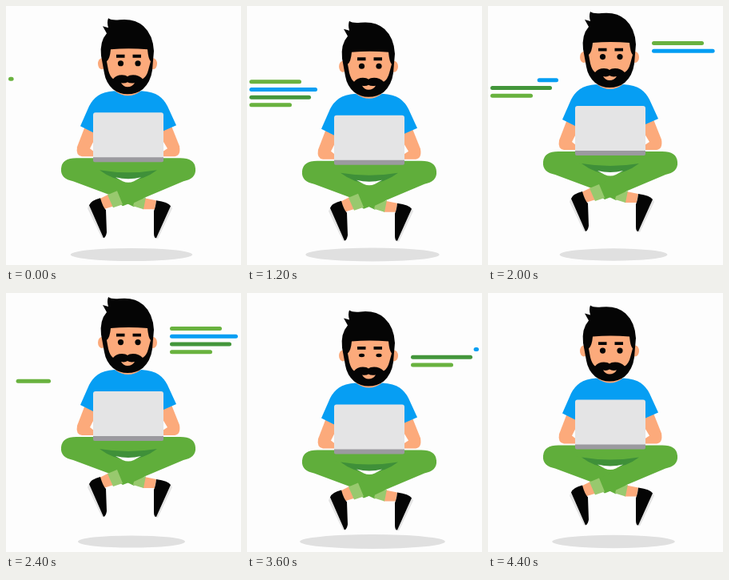
An HTML page for the animation above (4500 ms loop, 294 by 324 pixels).

```html
<!DOCTYPE html>
<html lang="en">
<head>
<meta charset="utf-8">
<title>Floating coder</title>
<style>
html, body { margin: 0; width: 100%; height: 100%; overflow: hidden; background: #fdfdfd; }
svg { display: block; width: 294px; height: 324px; }
.skin { fill: #fcaa7b; }
.shirt { fill: #069ef3; }
.pants { fill: #60ae3b; }
.cuff { fill: #98c96e; }
.ink { fill: #050505; }
.gap { fill: #fdfdfd; }
</style>
</head>
<body>
<svg viewBox="0 0 294 324">
  <ellipse id="shadow" cx="157" cy="311" fill="#e0e0e0"/>
  <g id="float">
    <g id="lines" fill="none" stroke-width="5" stroke-linecap="round"></g>

    <!-- arms and shirt -->
    <g class="skin">
      <path d="M99 150L89 176Q87 187 95 188H114V150Z"/>
      <path d="M207 150L217 175Q219 187 211 188H194V150Z"/>
      <path d="M137 100H168V114H137Z"/>
    </g>
    <path class="gap" d="M110 168L105 178L110 182ZM196 168L202 178L196 182Z"/>
    <path class="shirt" d="M136 106Q122 107 115 112Q108 117 104 125L93 150L109 158V164H197V156L213 149L202 125Q198 117 191 112Q184 107 169 106Q153 118 136 106Z"/>

    <!-- legs -->
    <path class="pants" d="M110 190H88Q70 190 69 203C68 212 74 217 84 219L127 235L160 251L174 239L153 230L186 217L196 190Z"/>
    <path class="pants" d="M196 190H218Q236 190 237 203C238 212 232 217 222 219L177 238L146 250L128 236L154 224L176 214L110 204V190Z"/>
    <path fill="#3f9039" d="M117 205Q153 211 189 205Q172 218 153 218Q134 218 117 205Z"/>
    <path class="gap" d="M137 214Q153 218 169 214L160 219Q153 222 146 219Z"/>
    <path class="skin" d="M117 241L129 235L135 250L122 254ZM173 240L188 243L186 254L171 254Z"/>
    <path class="cuff" d="M127 236L139 231L146 248L134 252ZM160 246L175 239L172 254L159 250Z"/>

    <!-- shoes -->
    <path fill="#e4e4e4" d="M104 248L102 253L120 290L124 289ZM205 248L208 253L190 291L185 290Z"/>
    <path class="ink" d="M104 249Q106 243 118 240Q121 251 125 255L126 283Q125 289 122 290Z"/>
    <path class="ink" d="M206 250Q203 245 188 243Q187 252 185 256V284Q185 290 188 290Z"/>

    <!-- laptop -->
    <rect x="109" y="133" width="88" height="60" rx="3" fill="#e4e4e5"/>
    <path fill="#9b9a9f" d="M109 189H197V193Q197 195 195 195H111Q109 195 109 193Z"/>

    <!-- head -->
    <g class="skin">
      <ellipse cx="120" cy="72" rx="5" ry="7"/>
      <ellipse cx="184" cy="72" rx="5" ry="7"/>
    </g>
    <path class="ink" d="M128 15Q132 18 142 17Q161 15 172 25Q184 36 185 56L183 80Q181 95 171 104Q163 110 152 110Q142 110 134 104Q125 96 123 84L119 62Q117 44 126 34L121 25L128 27Q126 20 128 15Z"/>
    <path class="skin" d="M126 69Q130 66 131 54Q153 52 177 54Q178 66 181 69L178 80Q176 88 171 91Q166 86 159 86Q154 86 152 88Q150 86 145 86Q138 86 134 91Q130 88 128 80Z"/>
    <path class="skin" d="M144 96Q149 97 152 95Q155 97 161 96Q158 101 152 101Q147 101 144 96Z"/>
    <path fill="none" stroke="#050505" stroke-width="3.8" d="M138 62.5H148.5M158.5 62.5H169"/>
    <g id="eyes" class="ink">
      <circle cx="143.5" cy="71.5" r="3.6"/>
      <circle cx="165" cy="71.5" r="3.6"/>
    </g>
  </g>
</svg>
<script>
const LOOP = 4500, STEP = 100;
const LOW = 139.5, REST = 133, RISE = 16.5; // height of the laptop lid
const $ = id => document.getElementById(id);
const clamp = v => Math.max(0, Math.min(1, v));
const ease = p => (1 - Math.cos(Math.PI * p)) / 2;

// time and lift at each turn of the hover
const TURNS = [[0, 0.46], [650, 0], [2350, 1], [3700, 0], [LOOP, 0.46]];

function liftAt(t) {
  const i = TURNS.findIndex(([end]) => t < end);
  const [t0, a] = TURNS[i - 1], [t1, b] = TURNS[i];
  return (a + (b - a) * ease((t - t0) / (t1 - t0))) ** 1.25;
}

const BARS = [
  { color: '#69b23f', run: 60 },
  { color: '#069ef3', run: 80 },
  { color: '#43963b', run: 72 },
  { color: '#69b23f', run: 48 }
];
// bars enter and leave one after another
const GROUPS = [
  { x: 5.5, y: 91, enter: { start: -8, gap: 300, span: 300 }, leave: { start: 1500, gap: 280, span: 300 } },
  { x: 207.5, y: 54.5, enter: { start: 1672, gap: 190, span: 150 }, leave: { start: 3030, gap: 285, span: 290 } }
];

const lines = GROUPS.flatMap(group => BARS.map((bar, i) => {
  const path = document.createElementNS('http://www.w3.org/2000/svg', 'path');
  path.setAttribute('stroke', bar.color);
  $('lines').append(path);
  return { path, group, i, run: bar.run };
}));

function drawLine({ path, group, i, run }, t) {
  const progress = ({ start, gap, span }) => clamp((t - start - i * gap) / span);
  const from = progress(group.leave), to = progress(group.enter);
  const visible = to > 0 && from < 1;
  path.setAttribute('d', visible
    ? `M${group.x + run * from} ${group.y + 9.7 * i}H${group.x + run * to + 0.01}` : '');
}

function draw(t) {
  const lift = liftAt(t);
  $('float').setAttribute('transform', `translate(0 ${LOW - RISE * lift - REST})`);
  const rx = 67 + 24 * (1 - lift) ** 2;
  $('shadow').setAttribute('rx', rx);
  $('shadow').setAttribute('ry', 4 + rx * 0.054);
  const open = Math.max(0.15, clamp(Math.abs(t - 3680) / 130));
  $('eyes').setAttribute('transform', `translate(0 71.5) scale(1 ${open}) translate(0 -71.5)`);
  lines.forEach(line => drawLine(line, t));
}

const begin = performance.now();
function tick() {
  const t = (performance.now() - begin) % LOOP;
  draw(Math.floor(t / STEP) * STEP);
  requestAnimationFrame(tick);
}
tick();
</script>
</body>
</html>
```
